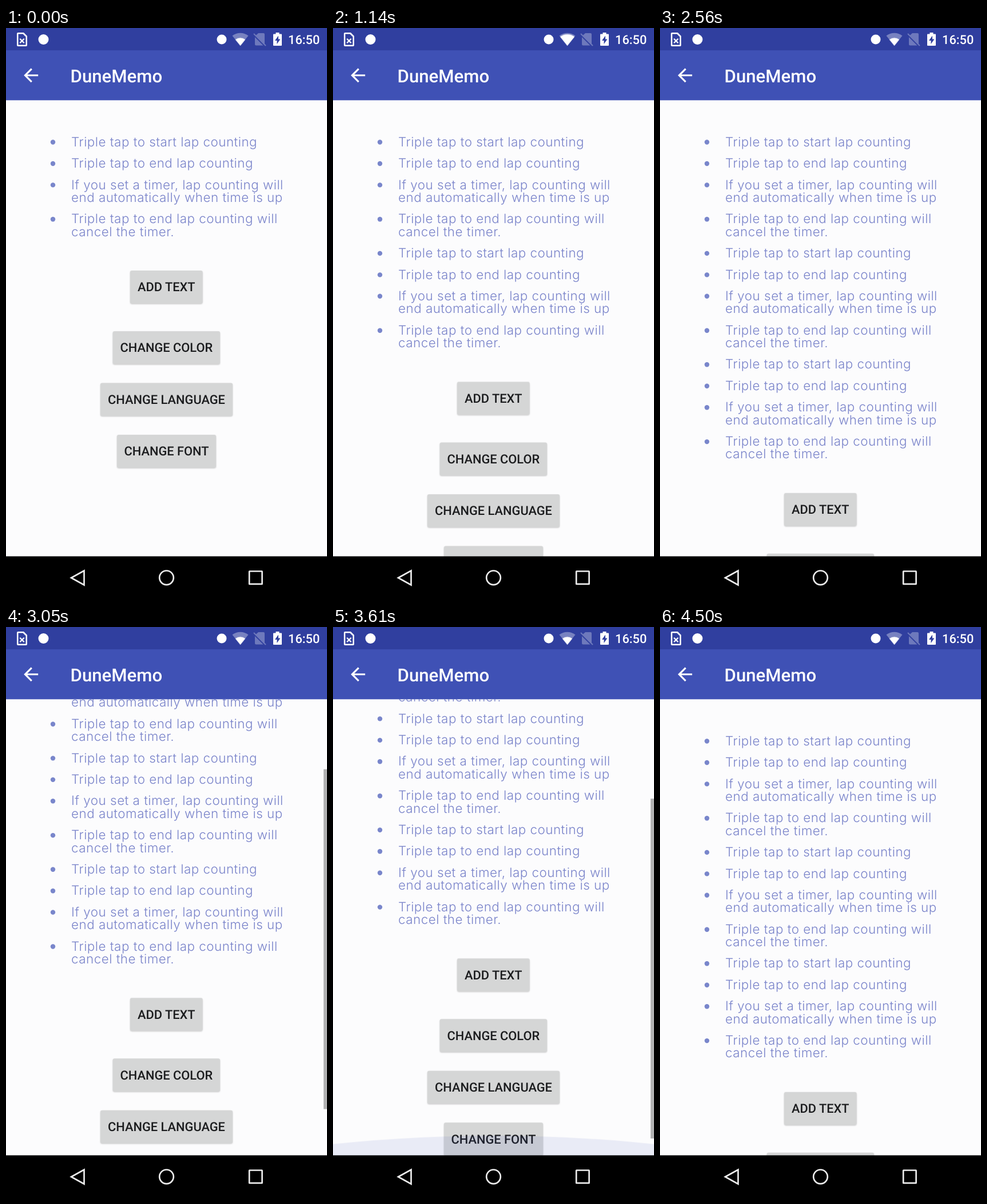
An HTML page that plays this animation: 561x998 px, repeating every 4530 ms.

```html
<!DOCTYPE html>
<html lang="en">
<head>
<meta charset="utf-8">
<title>Lap notes</title>
<style>
  html, body { margin: 0; width: 100%; height: 100%; overflow: hidden; background: #fcfcfd; }
  svg { display: block; width: 561px; height: 998px; }
  text { text-rendering: geometricPrecision; }

  .notes text { font: 300 22.4px Inter, Lato, sans-serif; letter-spacing: .49px; fill: #7983ca; }
  .notes circle { fill: #7986cb; }
  .button rect { fill: #d5d6d6; filter: drop-shadow(0 1.5px 1px rgba(0, 0, 0, .22)); }
  .button text { font: 500 21.8px Roboto, sans-serif; text-anchor: middle; fill: #1b1c1e; }
  .title { font: 500 31.2px Roboto, sans-serif; fill: #fff; }
  .clock { font: 500 21.8px Roboto, sans-serif; fill: #fff; }
  .nav { fill: none; stroke: #ececec; stroke-width: 2.7; }

  .anim { animation: 4530ms linear infinite; }
  .scroll { --k: -1; animation-name: scroll; }
  .thumb { --k: .745; animation-name: scroll, thumb; }
  .second { animation-name: second; }
  .third { animation-name: third; }
  .buttons { animation-name: grow; }
  .press { animation-name: press; }
  .ripple { animation-name: spread, fade; }
  .glow-top { animation-name: glow-top; }
  .glow-bottom { animation-name: glow-bottom; }
  .signal { animation-name: signal; }

  @keyframes scroll {
    0%, 64.018% { transform: translateY(0); }
    67.329% { transform: translateY(calc(var(--k) * 163.5px)); animation-timing-function: cubic-bezier(.3, .45, .6, 1); }
    69.536%, 80.353% { transform: translateY(calc(var(--k) * 233.5px)); animation-timing-function: ease-in-out; }
    83.664%, 100% { transform: translateY(0); }
  }
  @keyframes thumb {
    0% { opacity: 0; animation-timing-function: step-end; }
    64.018%, 91.611% { opacity: 1; }
    97.13%, 100% { opacity: 0; }
  }
  @keyframes second {
    0% { opacity: 0; animation-timing-function: step-end; }
    15.673%, 100% { opacity: 1; }
  }
  @keyframes third {
    0% { opacity: 0; animation-timing-function: step-end; }
    47.02%, 100% { opacity: 1; }
  }
  @keyframes grow {
    0% { transform: translateY(0); animation-timing-function: step-end; }
    15.673% { transform: translateY(194.4px); animation-timing-function: step-end; }
    47.02%, 100% { transform: translateY(388.8px); }
  }
  @keyframes press {
    0%, 15.67%, 25.166%, 47.01%, 56.512%, 100% { filter: drop-shadow(0 1.5px 1px rgba(0, 0, 0, .22)); }
    15.673%, 18.5%, 47.02%, 49.85% { filter: drop-shadow(0 2.5px 1.5px rgba(0, 0, 0, .26)); }
  }
  @keyframes spread {
    0% { transform: scale(.15); animation-timing-function: step-end; }
    15.673%, 47.02% { transform: scale(.15); animation-timing-function: cubic-bezier(.165, .84, .44, 1); }
    25.166% { transform: scale(1); animation-timing-function: step-end; }
    56.512%, 100% { transform: scale(1); }
  }
  @keyframes fade {
    0% { opacity: 0; animation-timing-function: step-end; }
    15.673%, 47.02% { opacity: .08; }
    25.166% { opacity: 0; animation-timing-function: step-end; }
    56.512%, 100% { opacity: 0; }
  }
  @keyframes glow-bottom {
    0%, 69.536% { transform: scaleY(0); opacity: 0; animation-timing-function: ease-out; }
    75.055% { transform: scaleY(.71); opacity: .24; animation-timing-function: cubic-bezier(.333, .667, .667, 1); }
    88.3%, 100% { transform: scaleY(0); opacity: 0; }
  }
  @keyframes glow-top {
    0%, 83.664% { transform: scaleY(0); opacity: 0; animation-timing-function: cubic-bezier(.333, .667, .667, 1); }
    86.313% { transform: scaleY(.89); opacity: .09; animation-timing-function: cubic-bezier(.333, .667, .667, 1); }
    99.338%, 100% { transform: scaleY(0); opacity: 0; }
  }
  @keyframes signal {
    0% { transform: scale(.62); animation-timing-function: step-end; }
    8.168% { transform: scale(.9); animation-timing-function: step-end; }
    45.695%, 100% { transform: scale(.62); }
  }
</style>
</head>
<body>
<svg viewBox="0 0 561 998">
  <defs>
    <g id="notes" class="notes">
      <circle cx="82" cy="199.5" r="4.2"/>
      <text x="114" y="206.7">Triple tap to start lap counting</text>
      <circle cx="82" cy="237" r="4.2"/>
      <text x="114" y="244.2">Triple tap to end lap counting</text>
      <circle cx="82" cy="274.4" r="4.2"/>
      <text x="114" y="281.6">If you set a timer, lap counting will</text>
      <text x="114" y="303.9">end automatically when time is up</text>
      <circle cx="82" cy="334.3" r="4.2"/>
      <text x="114" y="341.4">Triple tap to end lap counting will</text>
      <text x="114" y="363.7">cancel the timer.</text>
    </g>
    <clipPath id="face"><rect x="217" y="424" width="126.5" height="57.5" rx="3"/></clipPath>
    <path id="fan" d="M0 0L-14 -17.5A23 23 0 0 1 14 -17.5Z"/>
  </defs>

  <rect width="561" height="998" fill="#fcfcfd"/>

  <g class="anim scroll">
    <use href="#notes"/>
    <g class="anim second"><use href="#notes" y="194.4"/></g>
    <g class="anim third"><use href="#notes" y="388.8"/></g>
    <g class="anim buttons">
      <g class="button">
        <rect class="anim press" x="217" y="424" width="126.5" height="57.5" rx="3"/>
        <g clip-path="url(#face)">
          <g transform="translate(283.5 453)"><circle class="anim ripple" r="80"/></g>
        </g>
        <text x="280.3" y="460.3">ADD TEXT</text>
      </g>
      <g class="button">
        <rect x="186.7" y="530" width="187.3" height="57.5" rx="3"/>
        <text x="280.3" y="566.4">CHANGE COLOR</text>
      </g>
      <g class="button">
        <rect x="165" y="620.5" width="231" height="57.5" rx="3"/>
        <text x="280.5" y="656.8">CHANGE LANGUAGE</text>
      </g>
      <g class="button">
        <rect x="194" y="711" width="173" height="57.5" rx="3"/>
        <text x="280.5" y="747.3">CHANGE FONT</text>
      </g>
    </g>
  </g>

  <g fill="#3f51b5">
    <g transform="translate(280.5 126)"><circle class="anim glow-top" cy="-728.3" r="841"/></g>
    <g transform="translate(280.5 923)"><circle class="anim glow-bottom" cy="728.3" r="841"/></g>
  </g>
  <rect class="anim thumb" x="555" y="126" width="6" height="594" fill="#b1b1b2"/>

  <rect width="561" height="126.3" fill="#3f51b5"/>
  <rect width="561" height="39" fill="#303f9f"/>

  <g fill="#fff">
    <path d="M21 8H31L37 14V30Q37 32 35 32H21Q19 32 19 30V10Q19 8 21 8Z"/>
    <path d="M21.5 10.5H29.5L34.5 15.5V29.5H21.5Z" fill="#303f9f"/>
    <path d="M24.3 18.8L31.7 26.2M31.7 18.8L24.3 26.2" stroke="#fff" stroke-width="2.3"/>
    <circle cx="65.5" cy="20" r="9"/>
    <circle cx="377" cy="20" r="8.5"/>
    <g transform="translate(409.5 31)">
      <use href="#fan" opacity=".35"/>
      <use class="anim signal" href="#fan"/>
    </g>
    <g opacity=".3">
      <path d="M441 9H450Q452 9 452 11V29L436 13.5ZM435 16L449.500 30.500H437Q435 30.500 435 28.500Z"/>
      <path d="M433 10L454 31" stroke="#fff" stroke-width="2"/>
    </g>
    <path d="M471.5 8H477.5V10.5H481Q482 10.5 482 11.5V30Q482 31 481 31H468Q467 31 467 30V11.5Q467 10.5 468 10.5H471.5Z"/>
    <path d="M476 13.5L470 22H473.5V28L479.5 19.5H476Z" fill="#303f9f"/>
  </g>
  <text class="clock" x="493" y="28">16:50</text>

  <path transform="translate(25 64) scale(1.558)" fill="#fff"
    d="M20 11H7.83L13.42 5.41L12 4L4 12L12 20L13.41 18.59L7.83 13H20Z"/>
  <text class="title" x="112.5" y="94.5">DuneMemo</text>

  <rect y="923.4" width="561" height="75"/>
  <g class="nav">
    <path d="M114 961L136.5 948.5V973.5Z"/>
    <circle cx="280.5" cy="960.8" r="12.3"/>
    <rect x="425.2" y="949.5" width="22.4" height="22.4" rx=".5"/>
  </g>
</svg>
</body>
</html>
```
